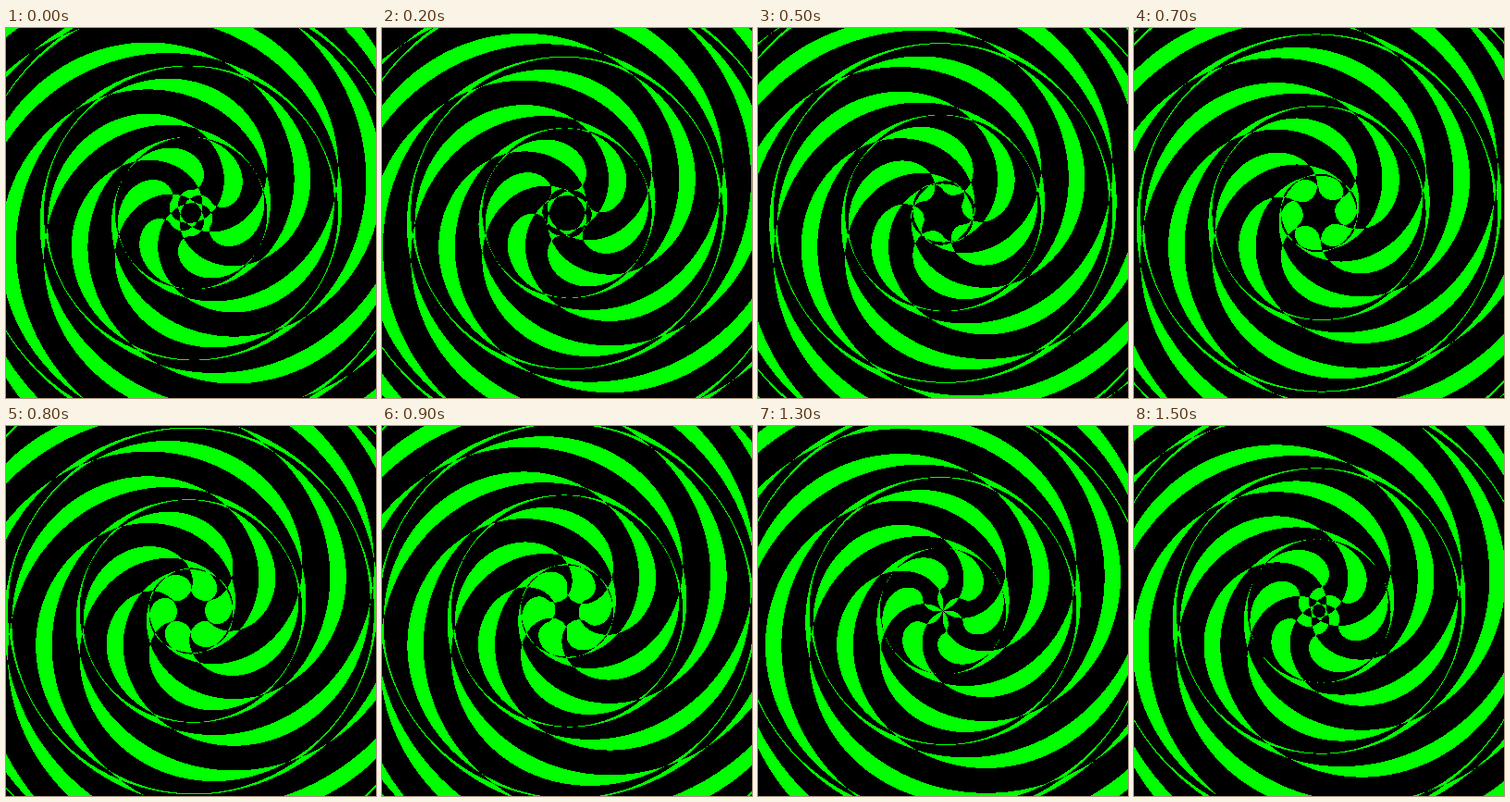
Write an HTML page with a canvas that moves like this. It is 400x400 px and loops after 1.6 s.

```html
<!DOCTYPE html>
<html lang="en">
<head>
<meta charset="utf-8">
<title>Six spirals</title>
<style>
  html, body { margin: 0; width: 100%; height: 100%; overflow: hidden; background: #000; }
  canvas { display: block; }
</style>
</head>
<body>
<canvas id="stage" width="400" height="400"></canvas>
<script>
const SIZE = 400, UNIT = 25, ARMS = 6;
const LOOP = 1600, STEPS = 16;
const BLACK = 0xff000000, GREEN = 0xff00ff00;

const ctx = document.getElementById('stage').getContext('2d');
const image = ctx.createImageData(SIZE, SIZE);
const pixels = new Uint32Array(image.data.buffer);

// Phase, in half turns, of an Archimedean spiral centred on one hexagon corner.
function spiralField(k) {
  const corner = Math.PI / 6 + k * Math.PI / 3;
  const cx = Math.cos(corner), cy = Math.sin(corner);
  const field = new Float32Array(SIZE * SIZE);
  const mid = (SIZE - 1) / 2;
  for (let y = 0, i = 0; y < SIZE; y++) {
    const dy = (mid - y) / UNIT - cy;
    for (let x = 0; x < SIZE; x++, i++) {
      const dx = (x - mid) / UNIT - cx;
      const turn = Math.atan2(dy, dx) - corner - Math.PI / 2;
      field[i] = (Math.sqrt(dx * dx + dy * dy) - turn) / Math.PI;
    }
  }
  return field;
}

const fields = Array.from({ length: ARMS }, (_, k) => spiralField(k));

// The six spirals are combined by exclusive or.
function draw(phase) {
  for (let i = 0; i < pixels.length; i++) {
    let parity = 0;
    for (let k = 0; k < ARMS; k++) parity ^= Math.floor(fields[k][i] - phase);
    pixels[i] = parity & 1 ? GREEN : BLACK;
  }
  ctx.putImageData(image, 0, 0);
}

const start = performance.now();
let shown = -1;

function tick() {
  const time = (performance.now() - start) % LOOP;
  const step = Math.floor(time / LOOP * STEPS);
  if (step !== shown) {
    shown = step;
    draw(step / STEPS);
  }
  requestAnimationFrame(tick);
}
tick();
</script>
</body>
</html>
```
